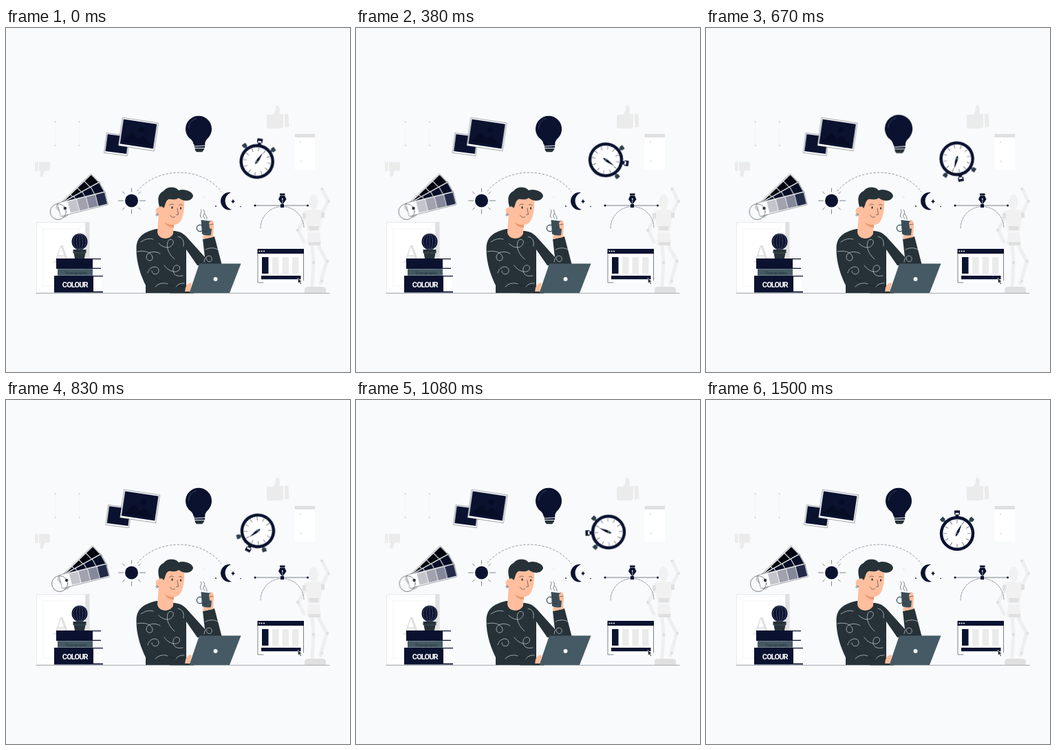
An HTML page without scripts for the animation above (1.54 s loop, 500 px wide and 500 px high).

```html
<!DOCTYPE html>
<html lang="en">
<head>
<meta charset="utf-8">
<title>Designer at work</title>
<style>
  html, body { margin: 0; height: 100%; overflow: hidden; background: #f8fafc; }
  svg { display: block; width: 100vw; height: 100vh; }
  .navy { fill: #0a1230; }
  .ink { fill: #263238; }
  .slate { fill: #455a64; }
  .skin { fill: #ffbe9d; }
  .pale { fill: #ebebeb; }
  .mist { fill: #f1f1f2; }
  .grey { fill: #e0e0e0; }
  .white { fill: #fff; }
  .line { fill: none; stroke: #263238; stroke-width: .6; stroke-linecap: round; }
  .faint { fill: none; stroke: #ebecee; stroke-width: .6; }
  .thread { fill: none; stroke: #dfe5e7; stroke-width: .65; stroke-linecap: round; }
  .edge { stroke: #263238; stroke-width: .4; }

  .shake, .beat, .spin { animation: 1540ms linear infinite; }
  .shake { animation-name: shake; }
  .beat { animation-name: beat; transform-origin: 280px 154px; }
  .spin { animation-name: spin; }

  /* Each 1.5 s move ends at 95.3% and rests until the loop restarts. */
  @keyframes spin {
    0% { transform: rotate(8deg); }
    95.3%, 100% { transform: rotate(360deg); }
  }
  @keyframes shake {
    0% { transform: translateX(-.2px); }
    7.6%, 85.5% { transform: translateX(-1px); }
    17.3%, 75.8% { transform: translateX(2px); }
    27.1%, 46.6%, 66% { transform: translateX(-4px); }
    36.8%, 56.3% { transform: translateX(4px); }
    95.3%, 100% { transform: none; }
  }
  @keyframes beat {
    0%, 25%, 33%, 52%, 100% { transform: scale(1); }
    12%, 42% { transform: scale(1.07); }
  }
</style>
</head>
<body>
<svg viewBox="0 0 500 500">
  <defs>
    <g id="card">
      <rect class="white edge" x="-9" y="-10" width="71" height="20" rx="1"/>
      <path d="M6-8.500h13v17h-13zM20-8.500h13v17h-13zM34-8.500h13v17h-13zM48-8.500h13v17h-13z"/>
    </g>
    <g id="pusher"><path class="slate" d="M-2-25h4v-3h-4z"/><path d="M-3.200-32h6.400v5h-6.400z" fill="#2f3e4a"/></g>
    <path id="rays" class="line" d="M-19 0h7M12 0h8M0-18v5M0 13v6M-13-13l3 3M13-13l-3 3M-13 13l3-3M13 13l-3-3"/>
  </defs>

  <!-- Pale background props -->
  <g id="crop-box">
    <path class="faint" d="M71.500 139v29M106.500 139v29" stroke-opacity=".6"/>
    <path class="grey" d="M70.500 135h2.500v2.500h-2.500zM105.500 135h2.500v2.500h-2.500zM70.500 169.500h2.500v2.500h-2.500zM105.500 169.500h2.500v2.500h-2.500z"/>
  </g>
  <g id="thumbs" class="pale">
    <path d="M379 128q0-2 3-2h6c4-4 4-8 4-12 3-3 6 0 6 4l-1 7h6v19l-4 2h-17q-3 0-3-4zM404.500 125l6-.5 1 19-6 1.500z"/>
    <path d="M64 206q0 1.500-2.500 1.500h-5c-2 3-2 5-2.500 8-3 2-5 0-4.500-3l.5-5h-2v-13h14q2 0 2 3zM42 194.500h4.500v13.500h-4.500z"/>
  </g>
  <g id="note">
    <path class="white" d="M419.500 154h29.500v52h-29.500z"/>
    <path class="grey" d="M419.500 154h29.500v5h-29.500zM427 165h2v2h-2zM427 193h3v1.500h-3z"/>
  </g>

  <g id="mannequin">
    <path fill="none" stroke="#efeff0" stroke-width="5" stroke-linecap="round" stroke-linejoin="round"
      d="M458 272l10-20-8-18M436 272l-11 22 8 17M445 316l2 25-2 33M454 316l12 23-9 32"/>
    <ellipse class="mist" cx="447" cy="253" rx="6.500" ry="11"/>
    <path class="mist" d="M433 266q14-5 28 0l-5 30h-17zM439 297h17l2 18h-21z"/>
    <path class="grey" d="M440 288h15l-1 6h-13zM440 311h17v5h-17zM431 269h5v8h-5zM458 268h5v8h-5z"/>
    <g class="grey">
      <circle cx="469" cy="252" r="2"/><circle cx="459" cy="234" r="2"/><circle cx="424" cy="294" r="2.200"/>
      <circle cx="447" cy="341" r="2.200"/><circle cx="467" cy="339" r="2.200"/><circle cx="459" cy="368" r="2"/>
    </g>
    <path class="grey" d="M434 385v-5q0-4 6-4h18q7 0 7 4v5z"/>
  </g>

  <g id="picture-frame">
    <path class="grey" d="M115 282h6.500v103h-6.500z"/>
    <path class="white" d="M44.500 282.500h71v102.500h-71z" stroke="#dcdee0" stroke-width=".6"/>
    <path class="faint" d="M54 292h52v83h-52zM44 282l10 10M115 282l-9 10M44 385l10-10M106 375l9 10"/>
    <text x="81" y="341" text-anchor="middle" font-family="'Liberation Serif', serif" font-size="37" fill="#e0e0e0">A</text>
  </g>

  <path class="line" d="M44 385.500H470" stroke-opacity=".65"/>

  <g id="books">
    <path class="white" d="M120 336h17v13h-17zM118 361h21v22h-21z"/>
    <path class="navy" d="M73 335h65v1.200h-12v12.600h12v1.200h-65zM70 360h71v1.300h-14v21.400h14v1.800h-71z"/>
    <path class="slate" d="M75 350.200h51v9.600h-51z"/>
    <g text-anchor="middle">
      <text x="102" y="357.500" font-family="'Liberation Serif', serif" font-size="6.800" fill="#263238">Typography</text>
      <text x="100.300" y="376.800" font-family="Roboto, sans-serif" font-size="11" font-weight="700" letter-spacing="-.9" fill="#fff">COLOUR</text>
    </g>
  </g>
  <g id="cactus">
    <ellipse class="navy" cx="107" cy="310.500" rx="11.500" ry="12"/>
    <g fill="none" stroke="#b9bfd0" stroke-width=".5" stroke-dasharray="1.500 1">
      <path d="M107 299v23"/>
      <ellipse cx="107" cy="310.500" rx="4.500" ry="11.500"/>
      <ellipse cx="107" cy="310.500" rx="9" ry="11.500"/>
    </g>
    <path class="ink" d="M97.500 322h19v5h-1l-1.500 8h-14l-1.500-8h-1z"/>
    <path d="M98.500 327h17" stroke="#455a64" stroke-width=".8"/>
  </g>

  <!-- Day to night -->
  <path class="line" d="M191 237C220 201 285 201 313 238" stroke-dasharray="2.500 3" stroke-opacity=".8"/>
  <g transform="translate(182.500 251)"><circle class="navy" r="9.500"/><use href="#rays"/></g>
  <path class="navy" d="M327 239A12.800 12.800 0 1 0 328 264A13.200 13.200 0 0 1 327 239zM330 248.500q.5 3 3 3.500-2.500.5-3 3.500-.5-3-3-3.500 2.500-.5 3-3.500z"/>
  <g class="navy"><circle cx="305" cy="259" r=".9"/><circle cx="341" cy="259.500" r=".8"/></g>
  <circle class="mist" cx="287.500" cy="246" r="2"/>

  <g id="pen-tool">
    <path class="line" d="M362 258H439"/>
    <path class="line" d="M370 291A31.500 31.500 0 0 1 433 291" stroke-dasharray="3 1.500" stroke-opacity=".8"/>
    <g class="navy">
      <circle cx="362" cy="258" r="1.500"/><circle cx="438.500" cy="258" r="1.500"/>
      <path d="M399 256h5v5h-5zM398 240.500h7.500v2.500h-7.500zM398.500 243.500h6.500l2.500 5.500-5.700 8-5.800-8z"/>
    </g>
    <path d="M401.800 256v-7" stroke="#fff" stroke-width=".6"/>
    <circle class="white" cx="401.800" cy="248.500" r=".9"/>
  </g>

  <g id="window">
    <path class="white" d="M366 326h66.500v44h-66.500z"/>
    <path class="line" d="M374 370h-8v-44M432.500 326v41"/>
    <path class="navy" d="M365.500 321h67.500v7h-67.500zM372 333h9.500v24h-9.500zM371 360h57.500v5.300h-57.500z"/>
    <g class="white"><circle cx="368.500" cy="324.500" r="1"/><circle cx="371.700" cy="324.500" r="1"/><circle cx="375" cy="324.500" r="1"/></g>
    <path class="pale" d="M387 333h9.500v24h-9.500zM401.500 333h9.500v24h-9.500zM416 333h9.500v24h-9.500z"/>
    <path class="ink" d="M424 363.500l6 5-2.300.3 1.600 3-1.300.7-1.600-3-1.700 1.500z" stroke="#fff" stroke-width=".5"/>
  </g>

  <!-- Moving props -->
  <g class="shake">
    <g transform="translate(160.500 169) rotate(7.500)">
      <rect class="white edge" x="-16" y="-14.500" width="34" height="29"/>
      <rect class="navy" x="-14.500" y="-13" width="31" height="25"/>
    </g>
    <g transform="translate(192.500 154.500) rotate(8.500)">
      <rect class="white edge" x="-26.300" y="-20.500" width="52.600" height="41"/>
      <rect class="navy" x="-24.500" y="-18.500" width="49" height="36"/>
      <g fill="#060c24"><path d="M-22 14l14-15 8 8 7-6 15 13z"/><circle cx="4" cy="-7" r="4"/></g>
    </g>
  </g>

  <g class="shake">
    <g transform="translate(86 262)">
      <use href="#card" transform="rotate(-44)" fill="#04060f"/>
      <use href="#card" transform="rotate(-29)" fill="#080e26"/>
      <g transform="rotate(-14)">
        <use href="#card" fill="#c4c5cc"/>
        <path fill="#a1a2ae" d="M20-8.500h13v17h-13z"/>
        <path fill="#85879a" d="M34-8.500h13v17h-13z"/>
        <path fill="#222a48" d="M48-8.500h13v17h-13z"/>
      </g>
      <circle class="line" cx="-10" cy="5" r="11.500"/>
      <circle class="ink" r="2.200"/>
    </g>
  </g>

  <g class="beat">
    <path class="navy" d="M265.500 159a19 19 0 1 1 29 0c-4 4-5 6-5.500 10h-16.500c-.5-4-2-6-7-10z"/>
    <path class="line" d="M265.500 146c0-7 5-13 11-14" style="stroke:#56607f"/>
    <path class="navy" d="M273.500 168h16l-.5 2.500-15.500 1zM274 172.500l15-1v2.500h-15z"/>
    <path class="ink" d="M274.500 175h14l-1.500 3-2 2.300h-8l-2-2.300z"/>
  </g>

  <g transform="translate(365 192)">
    <g class="spin">
      <g transform="translate(0 2)">
        <use href="#pusher" transform="rotate(46)"/>
        <use href="#pusher" transform="rotate(-46)"/>
        <path class="navy" d="M-2.500-24h5v-6h-5zM-4-33.500h8v6h-8z"/>
        <circle class="white" r="23" stroke="#0a1230" stroke-width="4.500"/>
        <circle r="17.500" fill="none" stroke="#263238" stroke-width="5" pathLength="12" stroke-dasharray=".07 .93" stroke-dashoffset=".035"/>
        <circle r="3" fill="#cfd8dc"/>
        <path class="navy" d="M-.8 4l-.9-8 1.700-11 1.700 11-.9 8z" transform="rotate(26)"/>
        <circle class="slate" r="1.300"/>
      </g>
    </g>
  </g>

  <!-- Designer -->
  <g id="designer">
    <path class="ink" d="M219 292C202 296 190 302 189.500 320C189 342 197 362 203 374V385H262V322L278 345H314L303 303 286 307 289 333 262 303C256 297 250 295 243 295z"/>
    <path d="M203 348q8 15 30 25 14 3 29 3" fill="none" stroke="#182226" stroke-width=".8"/>
    <g class="thread">
      <path d="M196 311q10-7 18-4M191 325c9-2 20 0 22 8 1 7-9 7-9 0 0-8 13-10 20-5"/>
      <path d="M222 313c8 8 18 8 21 0 2-6-6-8-8-2-3 10 4 20 10 25M250 303q10 2 8 14"/>
      <path d="M206 356c2-10 15-12 16-4 1 7-10 8-10 1M230 345c5 8 18 13 22 6 3-7-8-9-9-1-1 9 6 12 14 10"/>
      <path d="M290 322c8-4 14-2 18 0M288 340c0-8 9-12 11-6 2 7-8 8-8 0M217 376q8-8 18-4M247 376q5-6 12-5"/>
    </g>
    <path class="skin" d="M222 270L220 297C222 308 238 309 243 299L244 276z"/>
    <path class="skin" d="M225 245C222 262 223 279 234 284 241 288 250 287 254 280 259 271 260 257 258.500 245 250 234 232 234 225 245z"/>
    <path d="M230 282q7 5 14 4v4q-8 1-14-8z" fill="#eb996e"/>
    <ellipse class="skin" cx="221.500" cy="266" rx="3.800" ry="5.500"/>
    <circle class="line" cx="219.500" cy="271.500" r="1.500"/>
    <path class="ink" d="M223.500 261C220 251 220 241 229 237 234 230 246 230 251 236 258 233 271 237 272 244 271 251 260 254 251 247 246 251 240 248 236 249 231 252 232 258 229 262 228 259 224 258 223.500 261z"/>
    <g class="ink"><ellipse cx="241.500" cy="261" rx="1.200" ry="1.700"/><ellipse cx="254" cy="262" rx="1.100" ry="1.700"/></g>
    <path class="line" d="M237.500 257.500q3-3 6-1M251.500 257q3-2 5 1M249 262l1.500 9-3 .5M238.500 272q3 5 7 2.500"/>

    <path class="skin" d="M286 307L287 298 297 279Q300 278 302 286L301 304z"/>
    <circle cx="282" cy="291" r="4.700" fill="none" stroke="#455a64" stroke-width="1.400"/>
    <path d="M283.500 279l16.500 2-2 20q-8 1.500-13-1.500z" fill="#3b4d57"/>
    <path class="skin" d="M295 283q4-5 6-2l1 9q-4 3-6 1z"/>
    <path class="line" d="M287 290v1M292 290v1M287 295q3 3 5 0M296 286l5-1"/>
    <path class="line" d="M284 276c-5-5 3-8-1-12M289 277c-6-5 3-7-2-13M292 278c0-5-2-5-3-8"/>

    <path class="skin" d="M261 377q4-8 9-6l-3 13h-7z"/>
    <path class="ink" d="M238 383h35v2.500h-35z"/>
    <path class="slate" d="M281 342.500h60.500L325 385H266.500z"/>
    <circle cx="304.500" cy="365" r="3" fill="#f4f6f7"/>
  </g>
</svg>
</body>
</html>
```
